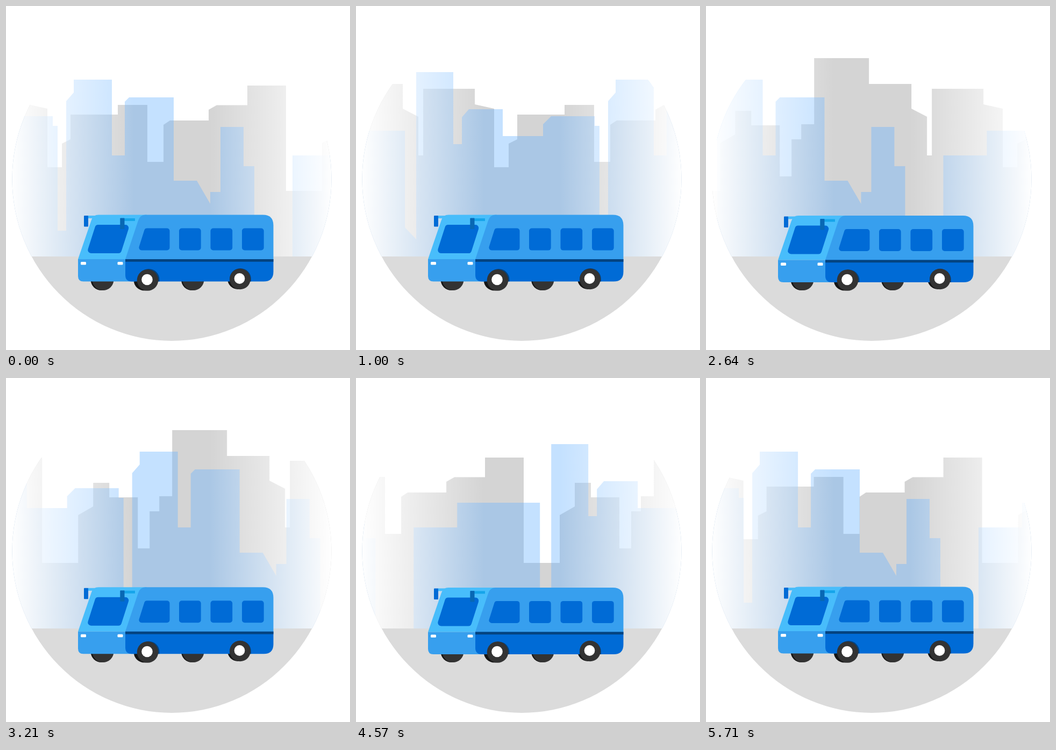
Animation of 640x640 px, one loop 5.78 s. Source, as an HTML page with a canvas:

```html
<!DOCTYPE html>
<html lang="en">
<head>
<meta charset="utf-8">
<title>City bus</title>
<style>
  html, body { margin: 0; width: 100%; height: 100%; overflow: hidden; background: #fff; }
  canvas { display: block; }
</style>
</head>
<body>
<canvas id="stage" width="640" height="640"></canvas>
<script>
const ctx = document.getElementById('stage').getContext('2d');
const LOOP = 5780;
const GROUND_Y = 466;
const TAU = Math.PI * 2;

const BLUE = '#006bd6', SKY = '#379fee', LIGHT = '#48bdfb', NAVY = '#04437f';
const TYRE = '#333', BLACK = '#151515';

// A skyline is one outline repeated every `period` pixels.
function skyline(outline, period, speed, color) {
  const tile = new Path2D(outline);
  const path = new Path2D();
  for (let i = -2; i <= 0; i++) path.addPath(tile, new DOMMatrix().translate(i * period, 0));
  return { path, period, speed, color };
}

const far = skyline(
  'M77 466V300H104V256L120 248V202H208V184H263V290H293V221L305 213H377V193L392 184.5H449V148H521' +
  'V344H588V255L616 239V195H646V222H699V317H721V248H739V220H763V97H865V145H944V191L973 206V278H982' +
  'V154H1078V183L1114 191V466Z', 1037, 7.2, '#d4d4d4');

const near = skyline(
  'M-245 466V123H-176V257H-160V207L-147 192H-84V242H-9V220L6 205H87V223H96V418H112V177L126 161V137H197' +
  'V278H221V178L229 170H312V325H355L380 368V346H399V225H442V298H462V466H533V278H614V232H768V412' +
  'L789 434V466Z', 1034, 14.28, 'rgba(102,178,255,0.386)');

const fade = ctx.createLinearGradient(8.5, 0, 608.5, 0);
[[0, 1], [0.383, 0], [0.617, 0], [1, 1]].forEach(([at, a]) =>
  fade.addColorStop(at, `rgba(255,255,255,${a})`));

function fillPath(d, color) {
  ctx.fillStyle = color;
  ctx.fill(new Path2D(d));
}

function disc(x, y, r, color) {
  ctx.fillStyle = color;
  ctx.beginPath();
  ctx.arc(x, y, r, 0, TAU);
  ctx.fill();
}

function box(x, y, w, h, r, color) {
  ctx.fillStyle = color;
  ctx.beginPath();
  ctx.roundRect(x, y, w, h, r);
  ctx.fill();
}

function roundPoly(points, r, color) {
  const [a, b] = [points[0], points[points.length - 1]];
  ctx.fillStyle = color;
  ctx.beginPath();
  ctx.moveTo((a[0] + b[0]) / 2, (a[1] + b[1]) / 2);
  points.forEach((p, i) => {
    const q = points[(i + 1) % points.length];
    ctx.arcTo(p[0], p[1], q[0], q[1], r);
  });
  ctx.closePath();
  ctx.fill();
}

function drawSkyline(layer, tick) {
  const shift = (tick * layer.speed) % layer.period;
  ctx.save();
  ctx.translate(shift, 0);
  ctx.fillStyle = layer.color;
  ctx.fill(layer.path);
  ctx.restore();
}

function drawScene(tick) {
  ctx.save();
  ctx.beginPath();
  ctx.ellipse(308.5, 322, 297, 301, 0, 0, TAU);
  ctx.clip();
  drawSkyline(far, tick);
  drawSkyline(near, tick);
  ctx.fillStyle = fade;
  ctx.fillRect(0, 0, 640, GROUND_Y);
  ctx.fillStyle = '#dbdbdb';
  ctx.fillRect(0, GROUND_Y, 640, 174);
  ctx.restore();
}

function drawArch(x, y, r) {
  ctx.fillStyle = NAVY;
  ctx.beginPath();
  ctx.arc(x, y, r, Math.PI, 0);
  ctx.lineTo(x + r, 512.5);
  ctx.lineTo(x - r, 512.5);
  ctx.fill();
}

function drawBody() {
  // front
  fillPath('M134 471L159 398Q162 388.5 172 388.5H262L226 471Z', LIGHT);
  fillPath('M134 471H240V512.5H144Q134 512.5 134 502.5Z', SKY);

  // side
  fillPath('M222 471L246 399Q249.5 388.5 259 388.5H478Q497.5 388.5 497.5 408V472H222Z', SKY);
  fillPath('M222 471H497.5V494.5Q497.5 512.5 479.5 512.5H234Q222 512.5 222 500.5Z', BLUE);
  ctx.fillStyle = NAVY;
  ctx.fillRect(222, 471, 275.5, 4.8);
  drawArch(265.5, 509, 20);
  drawArch(436, 508, 20);

  // windows
  roundPoly([[167, 407], [230.5, 407], [213.5, 460], [150, 460]], 6, BLUE);
  roundPoly([[258.5, 413.5], [304.5, 413.5], [304.5, 454.5], [245.5, 454.5]], 5, BLUE);
  [322, 380.5, 439].forEach(x => box(x, 413.5, 40.7, 41, 5, BLUE));

  // headlights
  [139, 207.5].forEach(x => box(x, 476, 10, 5.4, 1.5, '#fff'));

  // mirrors
  box(152, 390, 18, 5, 0, LIGHT);
  box(145, 390, 8, 20.5, 1, BLUE);
  box(219, 395, 21, 5, 0, '#16a5ea');
  box(212.3, 394.5, 8.2, 20.5, 1, '#0868b4');
}

function drawWheel(x, y, r, hub) {
  disc(x, y, r, TYRE);
  disc(x - 1, y - 1, hub, '#fff');
}

function drawBus(tick) {
  disc(177.5, 509, 20, BLACK);
  disc(180.5, 509, 20, TYRE);
  disc(346, 509, 20, BLACK);
  disc(348.5, 509, 20, TYRE);
  disc(257.5, 509.5, 20, BLACK);
  disc(431.5, 507.5, 19.5, BLACK);

  const bob = 0.75 * (1 - Math.cos(tick * TAU / 12));
  ctx.save();
  ctx.translate(0, bob);
  drawBody();
  ctx.restore();

  drawWheel(263.5, 510, 19.8, 10.3);
  drawWheel(435.5, 508, 19.3, 9.9);
}

// The picture holds at 14 steps per second over motion that runs at 25 ticks per second.
function tickAt(ms) {
  const step = Math.floor((Math.floor(ms / 10) + 0.5) * 0.14);
  const shown = Math.round(step * 100 / 14) * 10;
  return Math.ceil(shown / 40);
}

const start = performance.now();

function render() {
  const tick = tickAt((performance.now() - start) % LOOP);
  ctx.fillStyle = '#fff';
  ctx.fillRect(0, 0, 640, 640);
  drawScene(tick);
  drawBus(tick);
  requestAnimationFrame(render);
}
render();
</script>
</body>
</html>
```
